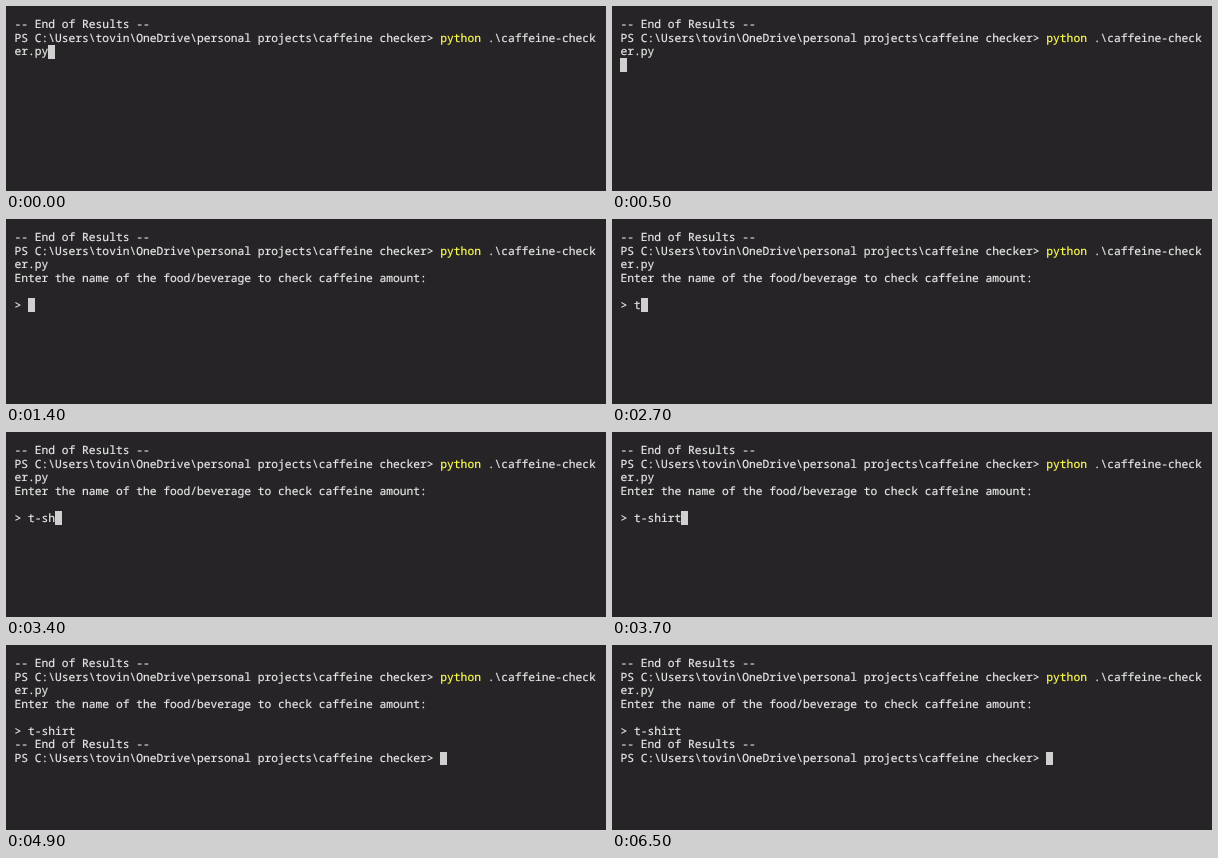
Write an HTML page that moves like this. It is 600 px wide and 185 px high and loops after 8 s.

```html
<!DOCTYPE html>
<html lang="en">
<head>
<meta charset="utf-8">
<title>Caffeine checker terminal</title>
<style>
  html, body { margin: 0; width: 100%; height: 100%; overflow: hidden; background: #262426; }
  #screen, #cursor {
    position: absolute;
    margin: 0;
    font: 11.27px/13.55px "Noto Sans Mono", monospace;
    text-rendering: geometricPrecision;
  }
  #screen {
    left: 8.5px;
    top: 12.1px;
    color: #e8e8e8;
    white-space: pre;
    -webkit-text-stroke: 0.2px;
  }
  #command { color: #ffff50; }
  #cursor { width: 7.2px; height: 13.8px; background: #d0d0d0; }
</style>
</head>
<body>
<pre id="screen"><span id="before"></span><span id="command">python</span><span id="after"></span></pre>
<div id="cursor"></div>
<script>
const LOOP = 8000;
const LEFT = 8.3, TOP = 11.7, LINE = 13.55;
const PROMPT = "PS C:\\Users\\tovin\\OneDrive\\personal projects\\caffeine checker> ";
const END = "-- End of Results --\n";

// Each entry appends its text to the terminal at the given time.
const output = [
  [0, " .\\caffeine-check\ner.py"],
  [500, "\n"],
  [1300, "Enter the name of the food/beverage to check caffeine amount:\n"],
  [1400, "\n> "],
  [2700, "t"],
  [3100, "-"],
  [3200, "s"],
  [3400, "h"],
  [3500, "i"],
  [3600, "r"],
  [3700, "t"],
  [4700, "\n"],
  [4800, END],
  [4900, PROMPT],
];

const byId = id => document.getElementById(id);
const after = byId("after"), cursor = byId("cursor");
byId("before").textContent = END + PROMPT;

function draw() {
  const time = performance.now() % LOOP;
  const text = output.filter(([at]) => at <= time).map(([, added]) => added).join("");
  if (after.textContent !== text) {
    after.textContent = text;
    const lines = text.split("\n");
    const column = lines[lines.length - 1].length;
    cursor.style.left = `calc(${LEFT}px + ${column}ch)`;
    cursor.style.top = `${TOP + lines.length * LINE}px`;
  }
  requestAnimationFrame(draw);
}
draw();
</script>
</body>
</html>
```
